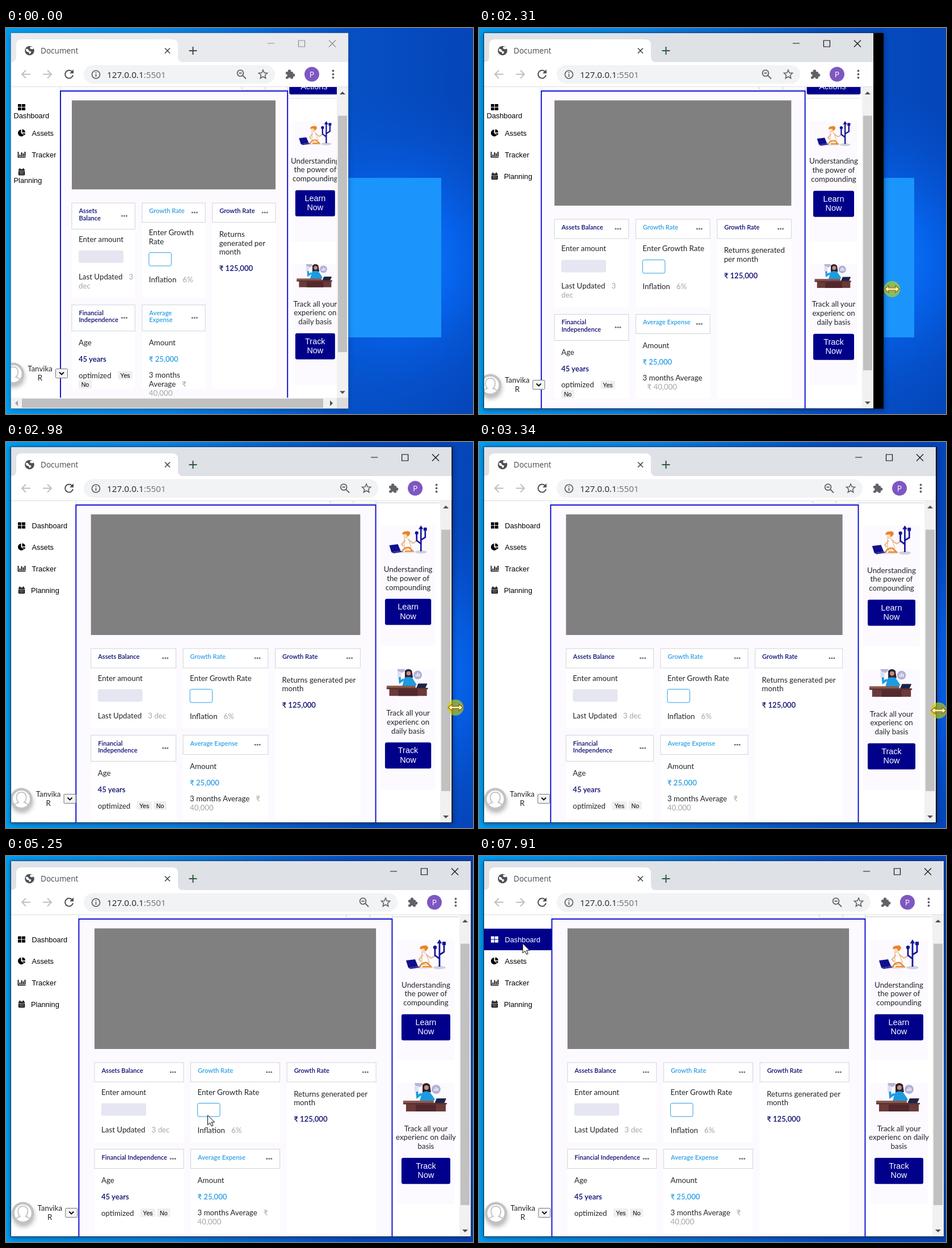
These frames come from a looping animation (823 by 680 pixels, 8 s). An HTML page:

```html
<!DOCTYPE html>
<html lang="en">
<head>
<meta charset="utf-8">
<title>Resizing a dashboard</title>
<style>
html, body { margin: 0; width: 100%; height: 100%; overflow: hidden; background: #0a5bd0; }
svg { display: block; width: 100%; height: 100%; }
text { white-space: pre; }
.body { font: 13.3px Lato, sans-serif; fill: #212529; }
.head { font: 600 11.1px Lato, sans-serif; }
.sum { font: 600 13.1px Lato, sans-serif; }
.nav { font: 12.8px "Liberation Sans", Arial, sans-serif; }
.btn { font: 14.4px "Liberation Sans", Arial, sans-serif; fill: #fff; }
.tag { font: 10.7px "Liberation Sans", Arial, sans-serif; fill: #000; }
.tab { font: 13.6px "Open Sans", sans-serif; fill: #45494d; }
.url { font: 15.3px "Open Sans", sans-serif; fill: #202124; }
.chip { font: 14px "Open Sans", sans-serif; fill: #fff; }
.mid { text-anchor: middle; }
.dim { fill: #a3a5a8; }
</style>
</head>
<body>
<svg viewBox="0 0 823 680" preserveAspectRatio="none">
  <defs>
    <linearGradient id="sky">
      <stop offset="0" stop-color="#009ff0"/><stop offset=".35" stop-color="#0a86e6"/>
      <stop offset=".75" stop-color="#0650c4"/><stop offset="1" stop-color="#0545b8"/>
    </linearGradient>
    <radialGradient id="glow" gradientUnits="userSpaceOnUse" cx="690" cy="410" r="300">
      <stop offset="0" stop-color="#0c84ff"/><stop offset=".35" stop-color="#0668f4" stop-opacity=".85"/>
      <stop offset="1" stop-color="#0650d0" stop-opacity="0"/>
    </radialGradient>
    <filter id="soft" x="-20%" y="-20%" width="140%" height="140%"><feGaussianBlur stdDeviation="4"/></filter>
  </defs>
  <rect width="823" height="680" fill="url(#sky)"/>
  <rect width="823" height="680" fill="url(#glow)"/>
  <rect x="486" y="264" width="281" height="281" fill="#1b95fb"/>
  <g id="win"></g>
  <g id="cur"></g>
</svg>
<script>
const LOOP = 8000, NAVY = '#00008b', SKY = '#2a9fe5';

// Screen updates: first, last, count
const UPDATES = [
  [0, 0, 1], [90, 890, 10], [990, 1560, 7], [1750, 1750, 1], [2040, 2770, 9], [2870, 3640, 9],
  [3730, 3840, 2], [4220, 4970, 9], [5050, 5810, 9], [6000, 6080, 2], [6300, 6300, 1],
  [6480, 7240, 9], [7340, 7340, 1], [7610, 7910, 4]
];
const SLACK = 12; // updates are not spaced quite evenly
const ticks = UPDATES.flatMap(([a, b, n]) =>
  Array.from({ length: n }, (_, i) => a + (n > 1 ? (b - a) * i / (n - 1) : 0)));

// Time, right edge of the page, width of the unpainted strip
const EDGE = [
  [1750, 603, 0], [2040, 616, 10], [2131, 640, 16], [2314, 695, 18], [2405, 722, 14], [2496, 742, 8],
  [2679, 768, 1.5], [2770, 775, 1.5], [3351, 805, 1.5], [3640, 815, 1.5], [3730, 819, 0]
];
// Time, x, y of the pointer
const PATH = [
  [90, 741, 646], [450, 672, 545], [890, 619, 459], [990, 606, 463], [1250, 602, 464], [1560, 608, 465],
  [1750, 608, 465], [2040, 632, 464], [2314, 728, 460], [2496, 757, 462], [2679, 775, 464], [2770, 783, 465],
  [3351, 810, 473], [3640, 820, 475], [3730, 826, 476], [3840, 735, 478], [4220, 735, 479], [4314, 712, 470],
  [4970, 399, 460], [5050, 399, 462], [5700, 250, 444], [5810, 236, 440], [6000, 234, 439], [6300, 236, 440],
  [6480, 228, 430], [6900, 130, 300], [7240, 77, 212], [7340, 78, 214], [7610, 79, 200], [7910, 77, 154]
];

function lerp(table, t) {
  let i = table.findIndex(k => k[0] >= t);
  if (i < 0) i = table.length - 1;
  if (i === 0) return table[0].slice(1);
  const a = table[i - 1], b = table[i];
  const p = Math.min(1, (t - a[0]) / (b[0] - a[0]));
  return a.slice(1).map((v, j) => v + (b[j + 1] - v) * p);
}

const rect = (x, y, w, h, fill, more = '') =>
  `<rect x="${x}" y="${y}" width="${w}" height="${h}" fill="${fill}" ${more}/>`;
const circle = (x, y, r, fill, more = '') => `<circle cx="${x}" cy="${y}" r="${r}" fill="${fill}" ${more}/>`;
const fillPath = (d, fill, more = '') => `<path d="${d}" fill="${fill}" ${more}/>`;
const line = (d, color, w = 1, more = '') =>
  `<path d="${d}" fill="none" stroke="${color}" stroke-width="${w}" ${more}/>`;
const text = (x, y, s, cls, fill) =>
  `<text x="${x}" y="${y}" class="${cls}"${fill ? ` style="fill:${fill}"` : ''}>${s}</text>`;
const group = (x, y, s, k = 1) => `<g transform="translate(${x} ${y}) scale(${k})">${s}</g>`;
const lines = (x, y, list, cls, step = 15.8, fill) =>
  list.map((s, i) => text(x, y + i * step, s, cls, fill)).join('');
const dim = (s, gap = 11) => `<tspan class="dim" dx="${gap}">${s}</tspan>`;

function chrome(R, active) {
  const ink = active ? '#111' : '#8a8d91', icon = '#5f6368', y = 81.5;
  return rect(9, 9, R - 9, 95, active ? '#dee1e6' : '#e8eaed') +
    fillPath('M9 60Q18 60 18 51V30Q18 20 28 20H293Q303 20 303 30V51Q303 60 312 60Z', '#fff') +
    rect(9, 60, R - 9, 43, '#fff') + rect(9, 103, R - 9, 1, '#dcdee1') +
    circle(41.5, 40, 8.3, '#4d5156') +
    fillPath('M35 37q4-1 5 2t4 2q1 3-3 5q0-4-3-4t-3-5M43 33q-2 3 1 4t5-1q-1-3-6-3', '#fff') +
    text(61, 45, 'Document', 'tab') +
    line('M280 35.5l9 9m0-9l-9 9', '#45494d', 1.7) +
    line('M322.5 40h14m-7-7v14', active ? '#2d5a3c' : '#45494d', 2) +
    line(`M${R - 142} 27h12`, ink) +
    line(`M${R - 87.5} 22h11v11h-11z`, ink, 1.2) +
    line(`M${R - 34} 21.5l12 12m0-12l-12 12`, ink, 1.2) +
    line('M43 81.5H28m7-7l-7 7l7 7M65 81.5h15m-7-7l7 7l-7 7', '#bbbdc0', 1.8) +
    line('M116.5 77a7 7 0 1 0 1.5 6', '#4d5156', 2) + fillPath('M119 73v7h-7z', '#4d5156') +
    rect(137, 65.5, R - 266, 32.5, '#f1f3f4', 'rx="16.2"') +
    circle(158.5, 82, 7, 'none', `stroke="${icon}" stroke-width="1.7"`) +
    line('M158.5 81v5m0-8.5v2', icon, 1.8) +
    text(178, 87.5, '127.0.0.1<tspan style="fill:#6b6f74">:5501</tspan>', 'url') +
    group(R - 190, y - 2, circle(0, 0, 5.4, 'none', `stroke="${icon}" stroke-width="1.8"`) +
      line('M4 4l6 6M-2.5 0h5', icon, 1.8)) +
    group(R - 150, y, line('M0-7.5L2.2-2.4L7.5-2L3.5 1.7L4.7 7L0 4.2L-4.7 7L-3.5 1.7L-7.5-2L-2.2-2.4Z', icon, 1.6)) +
    group(R - 102.5, y, rect(-7.5, -4.5, 13, 12.5, icon, 'rx="1.5"') + circle(-1, -5.5, 2.8, icon) +
      circle(6, 1.5, 2.8, icon) + circle(-7, 2, 2.2, '#fff') + circle(-1, 8, 2.2, '#fff')) +
    circle(R - 64, y, 13, '#7e57c2') + text(R - 64, 86.5, 'P', 'chip mid') +
    [-6, 0, 6].map(d => circle(R - 26.5, y + d, 1.9, icon)).join('');
}

const ICONS = [
  c => [0, 7].map(x => rect(x - 6.5, -5.5, 6, 5, c) + rect(x - 6.5, 0.5, 6, 5, c)).join(''),
  c => fillPath('M-1-6A6 6 0 1 0 4 4L-1 0Z', c) + fillPath('M1-6.5A6 6 0 0 1 6.5-1H1Z', c) +
    fillPath('M1 0.5H6.5A6 6 0 0 1 5 4Z', c),
  c => line('M-6-5V4.5H7', c, 1.6) + line('M-3 3V0M0 3V-4M3 3V-2M6 3V-5', c, 1.8),
  c => rect(-5.5, -4.5, 11, 10.5, c, 'rx="1"') + line('M-3-6.5v3M3-6.5v3', c, 1.6) +
    line('M-5.5-1.7h11', '#fff', 0.9) + line('M-3.5 1h7M-3.5 3.7h7', '#fff', 1.3, 'stroke-dasharray="1.6 1.2"')
];

function sidebar(left, hover, wide, lift) {
  const nav = ['Dashboard', 'Assets', 'Tracker', 'Planning'].map((name, i) => {
    const y = 147 + i * 38, on = hover === i, c = on ? '#fff' : '#000';
    const wrap = i === 0 ? left < 115 : i === 3 && left < 103;
    return (on ? rect(9, y - 19, left - 9, 38, NAVY) : '') +
      group(27.5, wrap ? y - 7.5 : y, ICONS[i](c)) +
      text(wrap ? 13.5 : i === 3 ? 44 : 45.5, (wrap ? y + 7 : y) + 4.5, name, 'nav', c);
  }).join('');
  const x = 88 + wide * 0.08, y = 629 - lift;
  const face = circle(1, 5, 19, '#000', 'opacity=".3" filter="url(#soft)"') +
    circle(0, 0, 19.5, '#c2c2c2') + circle(0, 0, 15, '#fff') +
    fillPath('M-14 12Q-10 7-5 6Q-9 2-8.500-4Q-8-12 0-12Q8-12 8.500-4Q9 2 5 6Q10 7 14 12', 'none', 'stroke="#c6c6c6" stroke-width="2"');
  return nav + group(x - 75.5, y, face) +
    lines(x - 28, y - 4, ['Tanvika', 'R'], 'body mid') +
    rect(x - 0.5, y - 8.5, 21, 16, '#f4f4f4', 'stroke="#767676" rx="1"') +
    line(`M${x + 6} ${y - 2.5}l4 4l4-4`, '#000', 1.8);
}

function cardHead(x, y, w, h, title, color) {
  return rect(x, y, w, h, '#fff', 'stroke="#ced4da"') +
    lines(x + 12.5, y + 18, title, 'head', 12.6, color) +
    [-4, 0, 4].map(d => circle(x + w - 18.8 + d, y + h / 2 - 0.3, 1.5, '#6f7276')).join('');
}

function cards(x0, width, top) {
  const gap = 12.6, w = (width - 2 * gap) / 3;
  const [a, b, c] = [0, 1, 2].map(i => x0 + i * (w + gap));
  const fit = (limit, one, two) => w >= limit ? one : two;
  const height = list => list.length > 1 ? 46 : 34;
  const assets = fit(116, ['Assets Balance'], ['Assets', 'Balance']);
  const indep = fit(156, ['Financial Independence'], ['Financial', 'Independence']);
  const expense = fit(126, ['Average Expense'], ['Average', 'Expense']);
  const rate = fit(122, ['Enter Growth Rate'], ['Enter Growth', 'Rate']);
  const returns = fit(143, ['Returns generated per', 'month'],
    fit(122, ['Returns generated', 'per month'], ['Returns', 'generated per', 'month']));
  const updated = fit(136, ['Last Updated' + dim('3 dec')], ['Last Updated' + dim('3'), dim('dec', 0)]);
  const months = fit(141, ['3 months Average' + dim('₹'), dim('40,000', 0)],
    fit(120, ['3 months Average', dim('₹ 40,000', 8)], ['3 months', 'Average' + dim('₹'), dim('40,000', 0)]));
  const ya = top + height(assets), yb = top + 34;
  const end1 = ya + (updated.length > 1 ? 121 : 106), row = end1 + 12.5;
  const yc = row + height(indep), yd = row + height(expense), low = row + 148;
  const extra = (rate.length - 1) * 15.8, t = 12;
  const tag = (x, y, tw, s) => rect(x, y - 8, tw, 15, '#efefef', 'rx="2"') + text(x + tw / 2, y + 4, s, 'tag mid');
  const opt = yc + 78.5, one = w >= 136;
  return [a, b].map(x => rect(x, top, w, end1 - top, '#fff') + rect(x, row, w, low - row, '#fff')).join('') +
    rect(c, top, w, low - top, '#fff') +
    cardHead(a, top, w, height(assets), assets, '#0a0a70') +
    cardHead(b, top, w, 34, ['Growth Rate'], SKY) +
    cardHead(c, top, w, 34, ['Growth Rate'], '#0a0a70') +
    cardHead(a, row, w, height(indep), indep, '#0a0a70') +
    cardHead(b, row, w, height(expense), expense, SKY) +
    text(a + t, ya + 22.5, 'Enter amount', 'body') +
    rect(a + t, ya + 37.5, 79, 22, '#e6e6f2', 'rx="3"') + lines(a + t, ya + 88.5, updated, 'body') +
    lines(b + t, yb + 22.5, rate, 'body') +
    rect(b + t, yb + extra + 37.5, 39.5, 23.5, '#fff', `rx="3" stroke="${SKY}"`) +
    text(b + t, yb + extra + 89.5, 'Inflation' + dim('6%'), 'body') +
    lines(c + t, yb + 25.5, returns, 'body') +
    text(c + t, yb + 54 + (returns.length - 1) * 15.8, '₹ 125,000', 'sum', '#0a0a70') +
    text(a + t, yc + 25.5, 'Age', 'body') + text(a + t, yc + 54.5, '45 years', 'sum', '#0a0a70') +
    text(a + t, opt + 4.5, 'optimized', 'body') + tag(a + t + 69, opt, 26, 'Yes') +
    tag(a + t + (one ? 98.5 : 0), one ? opt : opt + 16, 23, 'No') +
    text(b + t, yd + 25.5, 'Amount', 'body') + text(b + t, yd + 54.5, '₹ 25,000', 'sum', SKY) +
    lines(b + t, yd + 82.5, months, 'body');
}

const LEARN_ART =
  '<ellipse cx="-8" cy="50" rx="20" ry="2" fill="#e6e4ea"/><ellipse cx="24" cy="49.5" rx="11" ry="3" fill="#cfd0da"/>' +
  fillPath('M-35 37L-19 35L-14 47L-31 50Z', '#10108c') + fillPath('M-31 50L-14 47L-9 49L-27 52Z', '#2a2a9c') +
  fillPath('M-7 23Q0 21 2 29L6 41Q2 46-7 44Z', '#fff', 'stroke="#e0a060"') +
  line('M-11 49Q-8 40 2 41L9 48H-6', '#e58a2e', 2.6) + line('M0 26L9 33L16 29', '#e8b48c', 2.2) +
  line('M-5 27L-12 35L-9 39', '#e8b48c', 2.2) +
  circle(-5, 19, 3.8, '#fbd9bf') + fillPath('M-11 17Q-11 11-4 11Q3 9 4 15Q2 20-2 21Q-1 16-5 16Z', '#ea8424') +
  line('M24 4V48M24 34L16 28V15M24 27L32 22V10', '#14149a', 2.8) +
  fillPath('M24 0l4.5 7h-9z', '#14149a') + circle(16, 14, 3.2, '#14149a') + rect(29, 4, 6, 6, '#14149a');
const TRACK_ART =
  circle(-13, 0, 7, '#b6b3dc') + circle(18, 11, 8, '#b3b0d8') + line('M15 14v-4m3 4v-7m3 7v-5', '#fff', 1.6) +
  fillPath('M-6 3Q1-3 7 3L9 16H-6Z', '#2b2136') + circle(1, 8, 4, '#c98d74') +
  fillPath('M-11 32L-7 17Q1 12 8 17L16 29L12 32Z', '#1d9be0') + line('M-8 19L-15 24L-16 12', '#1d9be0', 4) +
  rect(-20, 5, 7, 10, '#dfe0ee') + fillPath('M15 36L19 27H36L32 36Z', '#1b2348') +
  rect(-35, 35, 70, 15, '#6a3a38') + rect(-40, 31, 54, 5, '#8a5a4e') + rect(-40, 35, 77, 2.5, '#5b2f30') +
  rect(-18, 38, 36, 12, '#52282c');

function offers(left, c, right, R) {
  const small = R < 735, first = small ? 164 : 147, second = small ? 416 : 400;
  // Text shift and button width
  const [shift, bw] = lerp([[603, 70, 70], [695, 71, 72], [768, 76.5, 79], [805, 79, 84], [819, 80, 86]], R);
  const block = (y, art, words, verb) =>
    rect(left + 7, y, right - left - 14, 213, '#fdfaff') + `<g clip-path="url(#art)">${group(c, y, art, bw / 86)}</g>` +
    lines(c, y + shift + 4.5, words, 'body mid') +
    rect(c - bw / 2, y + shift + 51.7, bw, 46, NAVY, 'rx="3"') +
    lines(c, y + shift + 70.8, [verb, 'Now'], 'btn mid', 16.5);
  const bar = small
    ? rect(left + 1.5, 95, right - left - 3, 22, NAVY, 'rx="3"') + text(c - 2, 107.5, 'Actions', 'btn mid') +
      rect(left, 123.5, right - left, 1, '#dcdee4')
    : rect(left, 106.5, right - left, 1.2, '#cfd1d6');
  return bar +
    `<clipPath id="art">${[first, second].map(y => rect(left, y, 200, 90, '#000')).join('')}</clipPath>` +
    block(first, LEARN_ART, ['Understanding', 'the power of', 'compounding'], 'Learn') +
    block(second, TRACK_ART, R < 812 ? ['Track all your', 'experienc on', 'daily basis']
      : ['Track all your', 'experienc on daily', 'basis'], 'Track');
}

function scrollbars(R, low, thumbEnd, sideways) {
  const x = R - 10, top = 154.5;
  return rect(R - 20, 104, 20, low - 104, '#f1f1f1') + rect(x - 8, top, 16, thumbEnd - top, '#c1c1c1') +
    fillPath(`M${x - 5} 117l5-5l5 5z`, '#505050') + fillPath(`M${x - 5} ${low - 12}l5 5l5-5z`, '#505050') +
    (sideways ? rect(9, low, R - 9, 670 - low, '#f1f1f1') + rect(28, low + 1.5, 531, 16, '#c1c1c1') +
      fillPath(`M21 ${low + 4.5}l-5 5l5 5z`, '#a0a0a0') + fillPath(`M571 ${low + 4.5}l5 5l-5 5z`, '#505050') +
      rect(R - 20, low, 20, 670 - low, '#dcdcdc') : '');
}

function windowView(R, strip, active, hover, caret) {
  const d = R - 603, sideways = R < 613, low = sideways ? 651.5 : 670;
  const left = 95.5 + 0.15 * d, right = 496.7 + 0.853 * d;
  const pageEnd = Math.max(R - 20, 593), mid = (right + pageEnd) / 2;
  const gx = 116 + 0.185 * d, gw = 359 + 0.635 * d;
  const [bottom, thumb] = lerp([[603, 284.3, 571], [695, 313, 603], [768, 340, 615]], R);
  const E = R + strip;
  const small = right - 81;
  return rect(8, 9, E - 7, 664, '#001a50', `opacity="${active ? 0.6 : 0.35}" filter="url(#soft)"`) +
    rect(8, 8.5, E - 7.5, 662.5, active ? '#1c2c48' : '#6d87a8') +
    rect(R, 9, strip, 661.5, '#000') + rect(9, 9, R - 9, 661, '#fff') +
    `<clipPath id="page">${rect(9, 104, R - 29, low - 104, '#000')}</clipPath><g clip-path="url(#page)">` +
    rect(left, 104, 1, 7, '#d9dbe0') +
    line(`M${small} 104v4.5h81M${small + 41} 104v4.5M${right} 104v6`, '#c4c7cd') +
    rect(left + 0.5, 111, right - left - 1, 600, '#fdfaff', 'stroke="#0909d2" stroke-width="1.9"') +
    rect(gx, 127.5, gw, bottom - 127.5, '#808080') + cards(gx, gw, bottom + 24) +
    (caret ? rect(172, 440, 1.5, 13, '#0a0a60') : '') +
    sidebar(left, hover, d, sideways ? 20 : 0) + offers(right + 1, mid, pageEnd - 1, R) + '</g>' +
    scrollbars(R, low, thumb, sideways) + chrome(R, active);
}

const POINTERS = {
  arrow: fillPath('M0 0V17L4 13.2L6.8 19.3L9.5 18L6.8 12.2H12.2Z', '#fff', 'stroke="#000"'),
  beam: line('M-5-9.5H-1.5L0-8.5L1.5-9.5H5M0-8.5V8.5M-5 9.5H-1.5L0 8.5L1.5 9.5H5', '#000', 1.8),
  resize: fillPath('M-13 0L-6-6V-2H6V-6L13 0L6 6V2H-6V6Z', '#fff4a8', 'stroke="#9a5a10" stroke-width="1.2"')
};

function pointerView(t) {
  if (t < 90) return '';
  const [x, y] = lerp(PATH, t);
  const kind = t >= 980 && t < 3800 ? 'resize'
    : (t >= 3800 && t < 4300) || (t >= 5760 && t < 6560) ? 'beam' : 'arrow';
  const pressed = (t >= 1550 && t < 3800) || (t >= 5990 && t < 6290);
  return group(x, y, (pressed ? circle(0, 0, 14.3, '#c8d700', 'opacity=".62"') : '') + POINTERS[kind]);
}

const win = document.getElementById('win'), cur = document.getElementById('cur');
const start = performance.now();
let shown = -1, lastKey = '';

function draw(now) {
  const time = Math.max(0, now - start) % LOOP;
  const t = ticks.filter(k => k <= time + SLACK).pop();
  if (t !== shown) {
    shown = t;
    const [R, strip] = lerp(EDGE, t), [px, py] = lerp(PATH, t);
    const row = Math.floor((py - 128) / 38);
    const hover = t > 6480 && px < 128 && row >= 0 && row < 4 ? row : -1;
    const caret = t >= 5990 && Math.floor((t - 5990) / 530) % 2 === 0;
    const state = [R, strip, t >= 1750, hover, caret], key = state.join();
    if (key !== lastKey) win.innerHTML = windowView(...state);
    lastKey = key;
    cur.innerHTML = pointerView(t);
  }
  requestAnimationFrame(draw);
}
draw(start);
</script>
</body>
</html>
```
